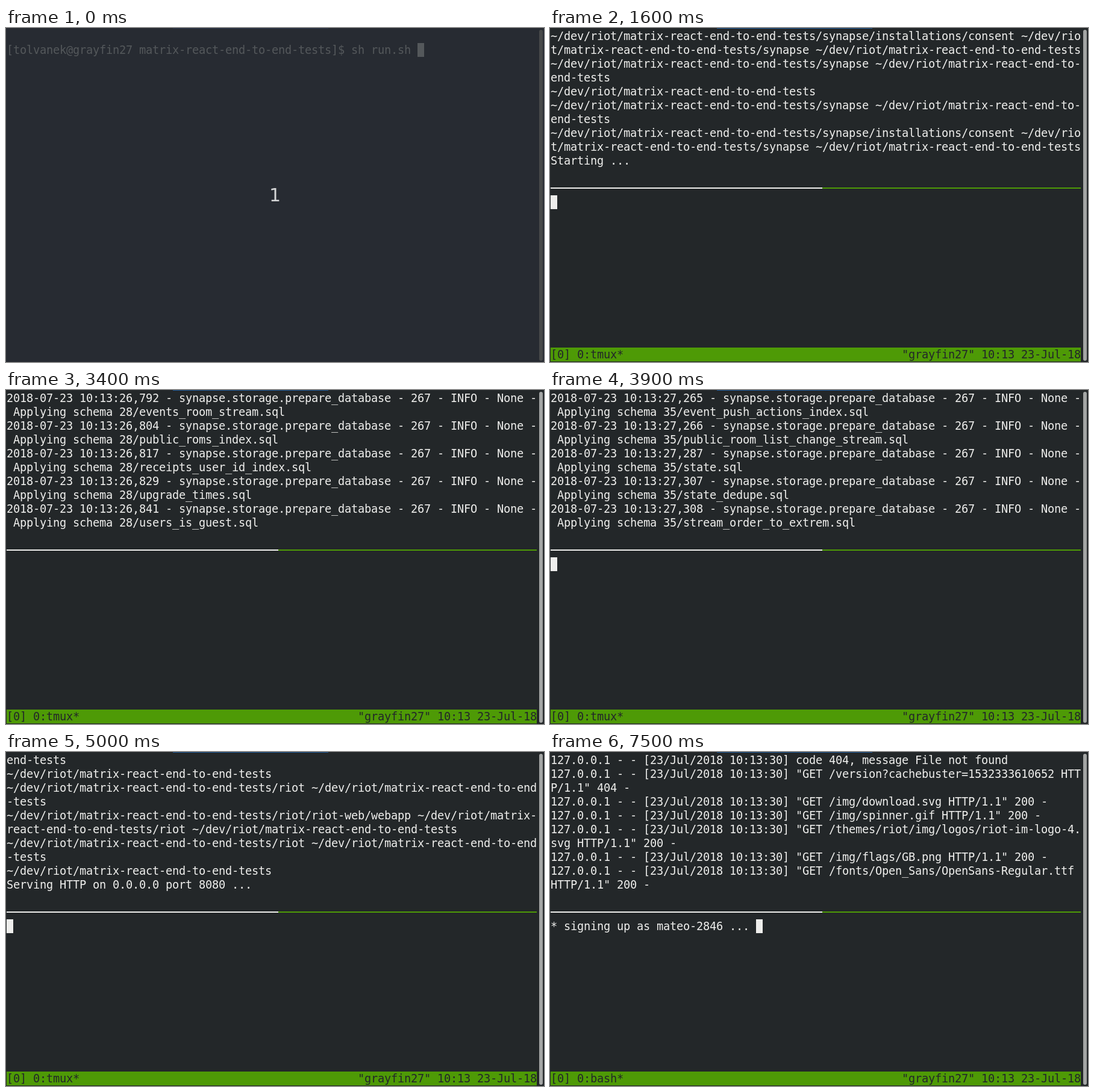
Animation of 893 by 555 pixels, one loop 8000 ms. Source, as an HTML page with a canvas:

```html
<!DOCTYPE html>
<html lang="en">
<head>
<meta charset="utf-8">
<title>Terminal session</title>
<style>
html, body { margin: 0; width: 100%; height: 100%; overflow: hidden; background: #232729; }
canvas { display: block; }
</style>
</head>
<body>
<canvas id="stage" width="893" height="555"></canvas>
<script>
const ctx = document.getElementById('stage').getContext('2d');
const LOOP = 8000, COLS = 80, CELL_W = 11, CELL_H = 23, LEFT = 1, TOP = 2, ASCENT = 18;
const USER = 'tolvanek', HOST = 'grayfin27', MEMBER = 'mateo-2846';

const BRIGHT = { bg: '#232729', fg: '#eeeeec', bar: '#a3a5a4', edge: '#215d9c' };
const DIM = { bg: '#272b32', fg: '#54585b', bar: '#484a4a', edge: '#28344a' };
const GREEN = '#4e9a06';

// Output of the upper pane, wrapped to the terminal width.
const rows = [];
function print(...lines) {
  for (const line of lines)
    for (let i = 0; i < line.length; i += COLS) rows.push(line.slice(i, i + COLS));
  return rows.length;
}

const ROOT = '~/dev/riot/matrix-react-end-to-end-tests';
const SYNAPSE = `${ROOT}/synapse ${ROOT}`;
const CONSENT = `${ROOT}/synapse/installations/consent ${SYNAPSE}`;
const RIOT = `${ROOT}/riot ${ROOT}`;
const WEBAPP = `${ROOT}/riot/riot-web/webapp ${RIOT}`;

function log(ms, source, line, text, level = 'INFO') {
  const sec = Math.floor(ms / 1000), frac = String(ms % 1000).padStart(3, '0');
  return print(`2018-07-23 10:13:${sec},${frac} - ${source} - ${line} - ${level} - None - ${text}`);
}

// Schema upgrades: "version name name ..."
const DELTAS = `17 drop_indexes server_keys user_threepids
18 server_keys_bigger_ints
19 event_index
20 dummy
21 end_to_end_keys receipts
22 receipts_index user_threepids_unique
23 drop_state_index
24 stats_reporting
25 00background_updates guest_access history_visibility tags
26 account_data
27 account_data forgotten_memberships
28 event_push_actions events_room_stream public_roms_index receipts_user_id_index upgrade_times users_is_guest
29 push_actions
30 alias_creator deleted_pushers presence_stream public_rooms push_rule_stream state_stream threepid_guest_access_tokens
31 invites local_media_repository_url_cache pushers_index
32 events openid pusher_throttle remove_indices reports
33 access_tokens_device_index devices devices_for_e2e_keys user_ips_index
34 appservice_stream device_inbox push_display_name_rename
35 add_state_index contains_url device_outbox device_stream_id event_push_actions_index public_room_list_change_stream state state_dedupe stream_order_to_extrem
36 readd_public_rooms
37 user_threepids
38 postgres_fts_gist
39 appservice_room_list device_federation_stream_idx event_push_index federation_out_position
40 device_list_streams event_push_summary pushers
41 device_list_stream_idx device_outbound_index event_search_event_id_idx ratelimit
42 current_state_delta device_list_last_id event_auth_state_only
43 profile_cache quarantine_media url_cache user_share
44 expire_url_cache
45 group_server profile_cache
46 drop_refresh_tokens user_dir_typos`;

const upgrades = [];
for (const delta of DELTAS.split('\n')) {
  const [version, ...names] = delta.split(' ');
  if (version > 17) upgrades.push([223, `Upgrading schema to v${version}`]);
  for (const name of names) upgrades.push([267, `Applying schema ${version}/${name}.sql`]);
}
const early = [26418, 26439, 26448, 26465, 26465];
const late = [27265, 27266, 27287, 27307, 27308];
const lateEnd = upgrades.findIndex(u => u[1].includes('stream_order_to_extrem'));
const lateStart = lateEnd - 4;

function upgradeTime(i) {
  if (i < 5) return early[i];
  if (i < lateStart) return Math.round(26465 + 800 * (i - 4) / (lateStart - 4));
  return i <= lateEnd ? late[i - lateStart] : 27308 + (i - lateEnd) * 11;
}

// Each step: from this time on, the first n rows have been printed.
const steps = [[0, 0]];
const step = (time, count) => steps.push([time, count]);

print(SYNAPSE);
step(1400, print(CONSENT, SYNAPSE, ROOT));
step(1600, print(SYNAPSE, CONSENT, 'Starting ...'));

const HOME = 'synapse.app.homeserver';
log(25782, 'root', 201, '***** STARTING SERVER *****', 'WARNING');
log(25783, 'root', 202, 'Server /synapse/app/homeserver.py version 0.32.2', 'WARNING');
log(25785, 'root', 205, 'Server hostname: localhost');
log(25806, HOME, 350, 'Server version: Synapse/0.32.2');
step(2400, log(25871, HOME, 372, 'Preparing database: sqlite3...'));

const base = rows.length;
upgrades.forEach(([line, text], i) => log(upgradeTime(i), 'synapse.storage.prepare_database', line, text));
const upTo = i => base + 2 * (i + 1);
for (let k = 0; k <= 9; k++) step(3000 + 100 * k, upTo(Math.round(4 + (lateEnd - 4) * k / 9)));
for (let k = 1; k <= 4; k++)
  step(3900 + 100 * k, upTo(Math.round(lateEnd + (upgrades.length - 1 - lateEnd) * k / 4)));

log(27804, HOME, 386, 'Database prepared in sqlite3.');
step(4500, print("started synapse.app.homeserver('homeserver.yaml')"));
step(4600, print(SYNAPSE));
step(4700, print(ROOT, RIOT));
step(4800, print(WEBAPP, RIOT, ROOT, 'Serving HTTP on 0.0.0.0 port 8080 ...'));

const request = text => print(`127.0.0.1 - - [23/Jul/2018 10:13:30] ${text}`);
const get = (path, code = 200) => request(`"GET ${path} HTTP/1.1" ${code} -`);
const bundle = name => get(`/bundles/91a6bca306f29bad5d8c/${name}.js`);
get('/');
['theme-dark', 'theme-light', 'theme-status', 'olm', 'bundle'].forEach(bundle);
step(6700, get('/img/warning.svg'));
get('/config.json');
get('/i18n/languages.json');
get('/i18n/en_EN.json');
request('code 404, message File not found');
get('/version?cachebuster=1532333610652', 404);
step(7200, get('/img/download.svg'));
get('/img/spinner.gif');
get('/themes/riot/img/logos/riot-im-logo-4.svg');
get('/img/flags/GB.png');
step(7300, get('/fonts/Open_Sans/OpenSans-Regular.ttf'));

const blinks = [700, 1300, 2000, 2600, 3200, 3800, 4500, 5000, 5700, 6300, 6700, 7500];

function rect(x, y, w, h, color) {
  ctx.fillStyle = color;
  ctx.fillRect(x, y, w, h);
}

function text(str, col, row, color) {
  ctx.fillStyle = color;
  for (let i = 0; i < str.length; i++)
    if (str[i] !== ' ') ctx.fillText(str[i], LEFT + (col + i) * CELL_W, TOP + row * CELL_H + ASCENT);
}

function drawCursor(col, row, t, color) {
  if (blinks.filter(b => b <= t).length % 2 === 0)
    rect(LEFT + col * CELL_W, TOP + row * CELL_H, CELL_W, CELL_H, color);
}

function drawShell(t, theme) {
  const prompt = `[${USER}@${HOST} matrix-react-end-to-end-tests]$ sh run.sh `;
  text(prompt, 0, 1, theme.fg);
  drawCursor(prompt.length, 1, t, theme.fg);
}

function drawPanes(t, theme) {
  const count = steps.filter(s => s[0] <= t).pop()[1];
  rows.slice(Math.max(0, count - 10), count).forEach((row, i) => text(row, 0, i, theme.fg));

  rect(1, 265, 451, 2, theme.fg);
  rect(452, 265, 429, 2, GREEN);

  const signing = t >= 6700;
  const message = signing ? `* signing up as ${MEMBER} ... ` : '';
  text(message, 0, 12, theme.fg);
  drawCursor(message.length, 12, t, theme.fg);

  rect(1, 531, 880, 23, GREEN);
  text(`[0] 0:${signing ? 'bash' : 'tmux'}*`, 0, 23, theme.bg);
  const clock = `"${HOST}" 10:13 23-Jul-18`;
  text(clock, COLS - clock.length, 23, theme.bg);
}

function drawCountdown() {
  ctx.font = '30px "DejaVu Sans", sans-serif';
  ctx.textAlign = 'center';
  ctx.fillStyle = '#d4d5d6';
  ctx.fillText('1', 446.5, 288);
  ctx.textAlign = 'left';
}

function draw(t) {
  const theme = t < 100 ? DIM : BRIGHT;
  rect(0, 0, 893, 555, theme.bg);
  rect(277, 0, 258, 1, theme.edge);
  ctx.fillStyle = theme.bar;
  ctx.beginPath();
  ctx.roundRect(885, 3, 6, 550, 3);
  ctx.fill();

  ctx.font = '18.67px "DejaVu Sans Mono", monospace';
  if (t < 1300) drawShell(t, theme);
  else drawPanes(t, theme);
  if (t < 100) drawCountdown();
}

function frame() {
  draw(performance.now() % LOOP);
  requestAnimationFrame(frame);
}
frame();
</script>
</body>
</html>
```
